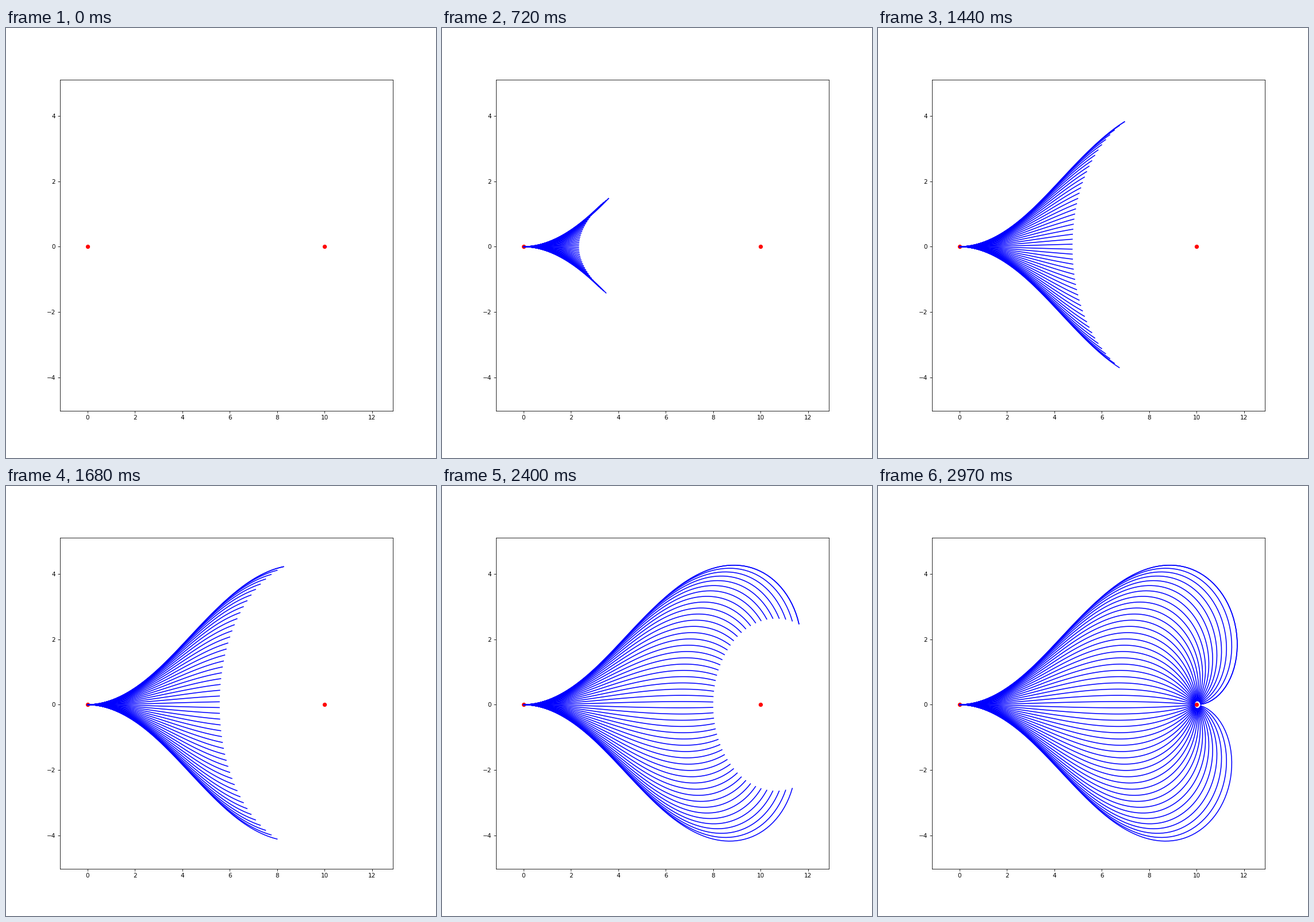
Recreate the animation shown at these times as a matplotlib script. Size 748 by 748 pixels, loop 3 s.

```python
import numpy as np
import matplotlib.pyplot as plt
from matplotlib.animation import FuncAnimation

N_CURVES = 50
N_POINTS = 100
GOAL_X = 10.0

# Gauss-Legendre nodes on [0, 1]
nodes, weights = np.polynomial.legendre.leggauss(48)
T, W = (nodes + 1) / 2, weights / 2


def heading(a, delta, t):
    """Clothoid heading at fraction t, from 0 at the start to delta at the end."""
    return a * t**2 + (delta - a) * t


def solve_sharpness(delta):
    """Newton search for the clothoid that ends on the x axis."""
    a = 3 * delta
    for _ in range(30):
        th = heading(a, delta, T)
        g = W @ np.sin(th)
        slope = W @ (np.cos(th) * (T**2 - T))
        a -= g / slope
    return a


def clothoid(goal_yaw):
    delta = (goal_yaw + np.pi) % (2 * np.pi) - np.pi
    a = solve_sharpness(delta)
    length = GOAL_X / (W @ np.cos(heading(a, delta, T)))
    u = np.linspace(0, 1, N_POINTS)
    th = heading(a, delta, np.outer(u, T))
    return length * u * (np.cos(th) @ W), length * u * (np.sin(th) @ W)


def padded(values):
    lo, hi = np.min(values), np.max(values)
    pad = 0.1 * (hi - lo)
    return lo - pad, hi + pad


paths = np.array([clothoid(yaw) for yaw in np.linspace(-np.pi, np.pi, N_CURVES)])

fig = plt.figure(figsize=(10, 10), dpi=74.8)
ax = plt.axes(xlim=padded(paths[:, 0]), ylim=padded(paths[:, 1]))
ax.plot(0, 0, "ro")
ax.plot(GOAL_X, 0, "ro")
lines = [ax.plot([], [], "b-")[0] for _ in paths]


def animate(i):
    for line, (x, y) in zip(lines, paths):
        line.set_data(x[:i], y[:i])
    return lines


anim = FuncAnimation(fig, animate, frames=N_POINTS, interval=30, repeat=True)
plt.show()
```
